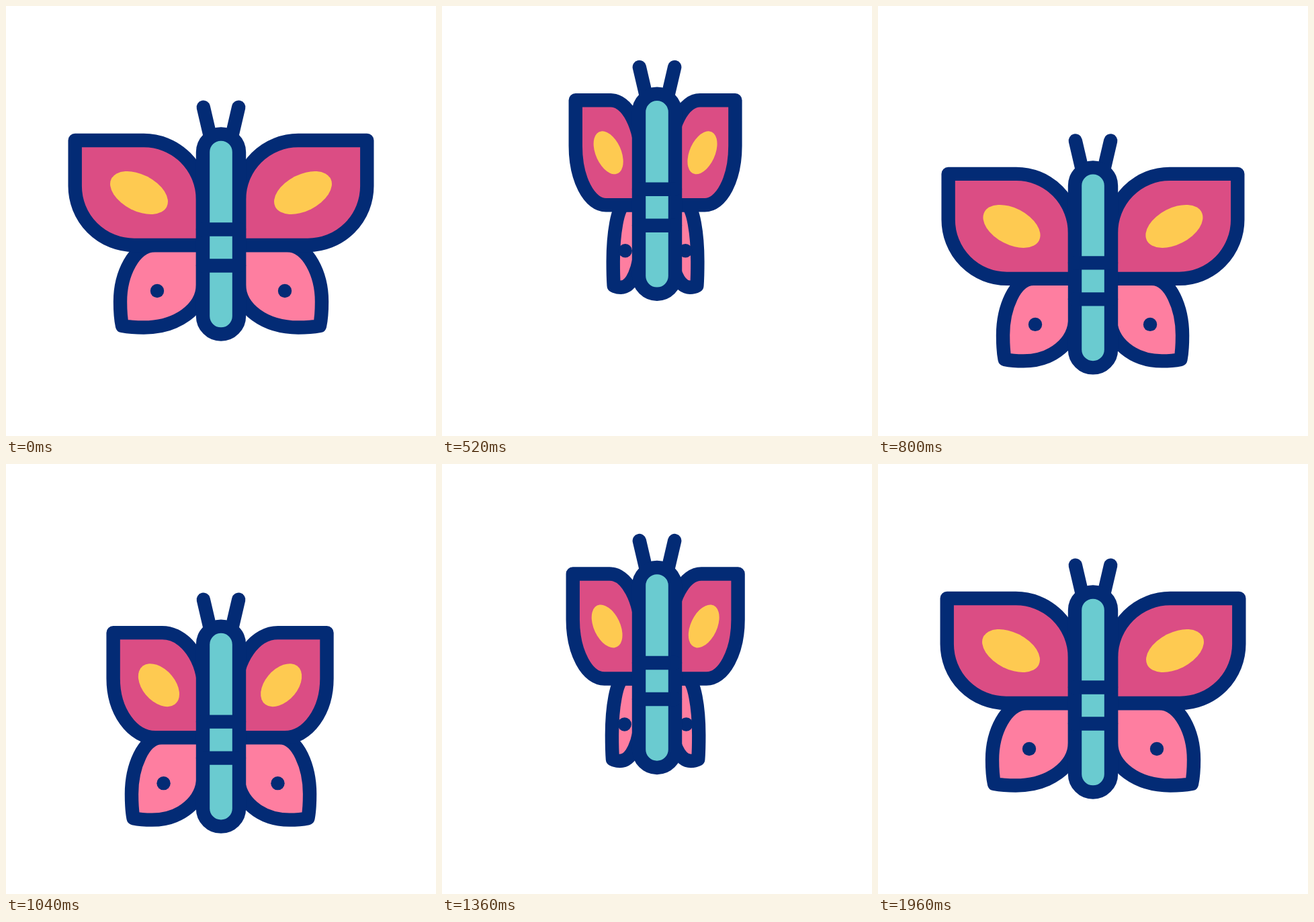
These frames come from a looping animation (640x640 px, 2 s). An HTML page:

```html
<!DOCTYPE html>
<html lang="en">
<head>
<meta charset="utf-8">
<title>Butterfly</title>
<style>
  @property --lift { syntax: "<length>"; inherits: true; initial-value: 0px; }
  @property --upper { syntax: "<number>"; inherits: true; initial-value: 1; }
  @property --lower { syntax: "<number>"; inherits: true; initial-value: 1; }

  html, body { margin: 0; width: 100%; height: 100%; overflow: hidden; background: #fff; }

  svg {
    display: block;
    width: 640px;
    height: 640px;
    --ease: cubic-bezier(.333, 0, .667, 1);
    animation: lift 2s var(--ease) infinite, upper 2s var(--ease) infinite, lower 2s var(--ease) infinite;
  }

  .line {
    stroke: #032b75;
    stroke-width: 20.4;
    stroke-linecap: round;
    stroke-linejoin: round;
    vector-effect: non-scaling-stroke;
  }

  #butterfly { transform: translateY(var(--lift)); }
  .upper { transform-origin: var(--upper-hinge) 0; transform: scaleX(var(--upper)); }
  .lower { transform-origin: var(--lower-hinge) 0; transform: scaleX(var(--lower)); }
  .left { --upper-hinge: 300px; --lower-hinge: 296px; }
  .right { --upper-hinge: 310px; --lower-hinge: 303.3px; }

  @keyframes lift {
    0% { --lift: 0px; }
    20.9% { --lift: -76px; }
    45.5%, 46.1% { --lift: 68px; }
    69.7% { --lift: -38px; animation-timing-function: cubic-bezier(.42, 0, .4, 1); }
    98%, 100% { --lift: 0px; }
  }
  @keyframes upper {
    0%, 41.65%, 82.45%, 100% { --upper: 1; }
    20.85%, 62.45% { --upper: .423; }
  }
  @keyframes lower {
    0%, 2%, 46.3%, 47%, 85.5%, 100% { --lower: 1; }
    23.3%, 65% { --lower: .3; }
  }
</style>
</head>
<body>
<svg viewBox="0 0 640 640">
  <defs>
    <g id="wing">
      <g class="lower">
        <path class="line" fill="#fe7ea0" d="M293 356H222C190 356 170 400 170 440C170 455 171 467 173 476C184 478 195 478.5 205 478.5C255 478.5 293 450 293 415Z"/>
        <path class="line" d="M225 424h.01"/>
      </g>
      <g class="upper">
        <path class="line" fill="#db4d84" d="M102.7 200H205A88 88 0 0 1 293 288V356H190.7A88 88 0 0 1 102.7 268Z"/>
        <ellipse fill="#feca51" rx="46.2" ry="27.1" transform="translate(198 278) rotate(27)"/>
      </g>
    </g>
  </defs>
  <g id="butterfly">
    <use href="#wing" class="left"/>
    <use href="#wing" class="right" transform="translate(640) scale(-1 1)"/>
    <path class="line" fill="none" d="M293.8 150.6L303 190M346.2 150.6L337 190"/>
    <rect class="line" fill="#6acbd0" x="293" y="190.5" width="54" height="298" rx="27"/>
    <path class="line" d="M293 332.5h54M293 386.5h54"/>
  </g>
</svg>
</body>
</html>
```
